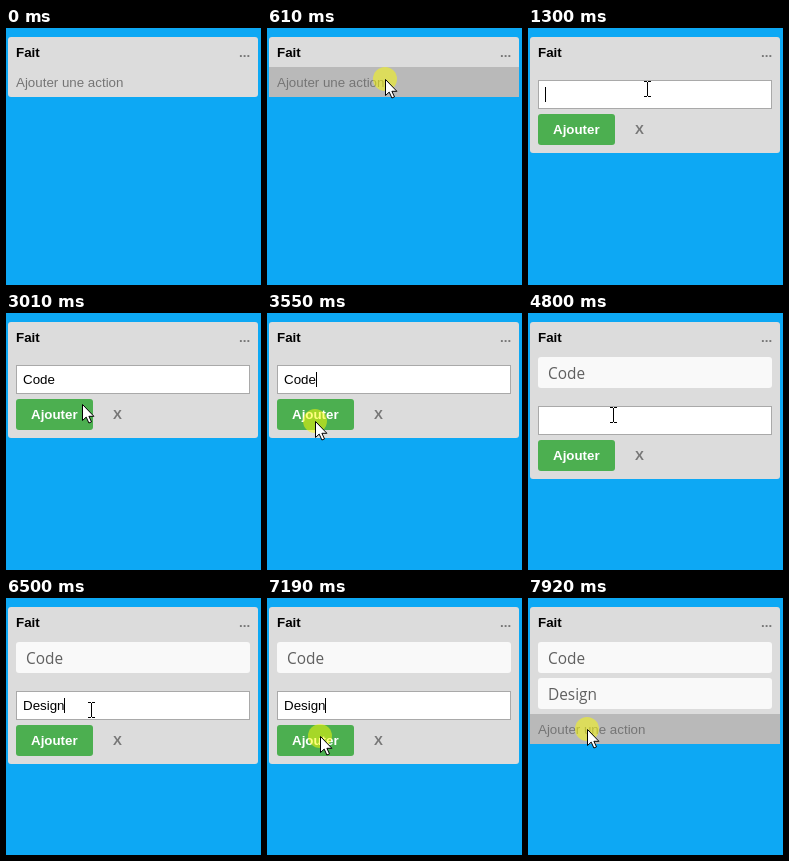
An HTML page with a canvas for the animation above (7.99 s loop, 255 by 257 pixels).

```html
<!DOCTYPE html>
<html lang="fr">
<head>
<meta charset="utf-8">
<title>Fait</title>
<style>
  html, body { margin: 0; height: 100%; overflow: hidden; background: #0da8f4; }
  canvas { display: block; }
</style>
</head>
<body>
<canvas id="stage" width="255" height="257"></canvas>
<script>
const ctx = document.getElementById('stage').getContext('2d');
const LOOP = 7990, STEP = 75, BLINK = 520, PRESS_RADIUS = 12;
const UI = '13.333px "Liberation Sans", Arial, sans-serif';
const BOLD = 'bold ' + UI;
const CARD = '15.4px "Open Sans", "Noto Sans", sans-serif';
const LINK_HEIGHT = 30, FORM_HEIGHT = 86, CARD_PITCH = 36;

// The pointer glides to each place in turn; press and release mark a click there.
const entry = { x: 150, y: 218 };
const glides = [
  { from: 230, to: 455, x: 118, y: 51, press: 610, release: 690 },
  { from: 990, to: 1065, x: 117, y: 60, press: 1220, release: 1300 },
  { from: 2710, to: 3010, x: 76, y: 91 },
  { from: 3090, to: 3240, x: 36, y: 122 },
  { from: 3400, to: 3550, x: 48, y: 108, press: 3550, release: 3720 },
  { from: 3795, to: 4020, x: 68, y: 92, press: 4190, release: 4340 },
  { from: 4570, to: 4720, x: 83, y: 101, press: 4880, release: 4960 },
  { from: 6500, to: 6500, x: 83, y: 111 },
  { from: 6575, to: 7100, x: 53, y: 138, press: 7190, release: 7360 },
  { from: 7680, to: 7755, x: 59, y: 131, press: 7920, release: LOOP }
];
const clicks = glides.filter(g => g.press);

// Every card takes three clicks: open the form, focus the input, submit.
const sessions = [
  { word: 'Code', firstKey: 1930, lastKey: 2230 },
  { word: 'Design', firstKey: 5420, lastKey: 6120 }
].map((session, i) => {
  const [opening, focusing, submitting] = clicks.slice(i * 3);
  return { ...session, open: opening.release, focus: focusing.press, close: submitting.release };
});

function pointerAt(t) {
  let { x, y } = entry;
  for (const glide of glides) {
    if (t < glide.from) break;
    const steps = Math.round((glide.to - glide.from) / STEP) + 1;
    const part = Math.min(steps, Math.floor((t - glide.from) / STEP) + 1) / steps;
    x += (glide.x - x) * part;
    y += (glide.y - y) * part;
  }
  return { x: Math.round(x), y: Math.round(y) };
}

function typing({ word, firstKey, lastKey, focus }, t) {
  const interval = (lastKey - firstKey) / (word.length - 1);
  const count = Math.max(0, Math.min(word.length, Math.floor((t - firstKey) / interval) + 1));
  const lastAction = count ? firstKey + (count - 1) * interval : focus;
  const caretOn = t >= focus && Math.floor((t - lastAction) / BLINK) % 2 === 0;
  return { text: word.slice(0, count), caretOn };
}

function box(x, y, w, h, color, radius = 0) {
  ctx.fillStyle = color;
  ctx.beginPath();
  ctx.roundRect(x, y, w, h, radius);
  ctx.fill();
}

function label(text, x, y, font, color) {
  ctx.font = font;
  ctx.fillStyle = color;
  ctx.fillText(text, x, y);
}

function drawForm(session, top, t) {
  const { text, caretOn } = typing(session, t);
  box(10, top + 13, 234, 29, '#a9a9a9');
  box(11, top + 14, 232, 27, '#fff');
  label(text, 17, top + 32, UI, '#000');
  if (caretOn) box(17 + Math.round(ctx.measureText(text).width), top + 20, 1, 15, '#000');
  box(10, top + 47, 77, 31, '#4caf50', 3);
  label('Ajouter', 25, top + 67, BOLD, '#fff');
  label('X', 107, top + 67, BOLD, '#777');
}

function drawArrow(x, y) {
  const outline = [[0, 0], [0, 16], [3.7, 12.6], [6.4, 18.5], [9, 17.4], [6.4, 11.8], [11.4, 11.8]];
  ctx.beginPath();
  outline.forEach(([dx, dy]) => ctx.lineTo(x + 0.5 + dx, y + 0.5 + dy));
  ctx.closePath();
  ctx.fillStyle = '#fff';
  ctx.fill();
  ctx.strokeStyle = '#000';
  ctx.lineJoin = 'round';
  ctx.stroke();
}

function drawTextCursor(x, y) {
  const left = x - 1, top = y - 7;
  box(left + 3, top + 1, 1, 14, '#000');
  for (const row of [top, top + 15]) {
    box(left, row, 3, 1, '#000');
    box(left + 4, row, 3, 1, '#000');
  }
}

function draw(t) {
  const cards = sessions.filter(s => t >= s.close);
  const session = sessions.find(s => t >= s.open && t < s.close);
  const top = cards.length ? 44 + CARD_PITCH * cards.length : 39;
  const bottom = top + (session ? FORM_HEIGHT : LINK_HEIGHT);
  const pointer = pointerAt(t);
  const visible = t >= glides[0].from;
  const hover = visible && pointer.y >= top && pointer.y < bottom;
  const overInput = session && pointer.y >= top + 13 && pointer.y < top + 42;

  box(0, 0, 255, 257, '#0da8f4');
  box(2, 9, 250, bottom - 9, '#dcdcdc', 3);
  label('Fait', 10, 29, BOLD, '#000');
  label('...', 233, 29, BOLD, '#777');
  cards.forEach((card, i) => {
    const y = 44 + CARD_PITCH * i;
    box(10, y, 234, 31, '#f9f9f9', 3);
    label(card.word, 20, y + 22, CARD, '#606060');
  });

  if (session) {
    drawForm(session, top, t);
  } else {
    if (hover) box(2, top, 250, LINK_HEIGHT, '#b9b9b9');
    label('Ajouter une action', 10, top + 20, UI, '#757575');
  }

  if (!visible) return;
  if (clicks.some(c => t >= c.press && t < c.release)) {
    const size = PRESS_RADIUS * 2;
    box(pointer.x - PRESS_RADIUS, pointer.y - PRESS_RADIUS, size, size, 'rgba(255,255,0,.5)', PRESS_RADIUS);
  }
  (overInput ? drawTextCursor : drawArrow)(pointer.x, pointer.y);
}

const began = performance.now();
function tick() {
  draw((performance.now() - began) % LOOP);
  requestAnimationFrame(tick);
}
tick();
</script>
</body>
</html>
```
